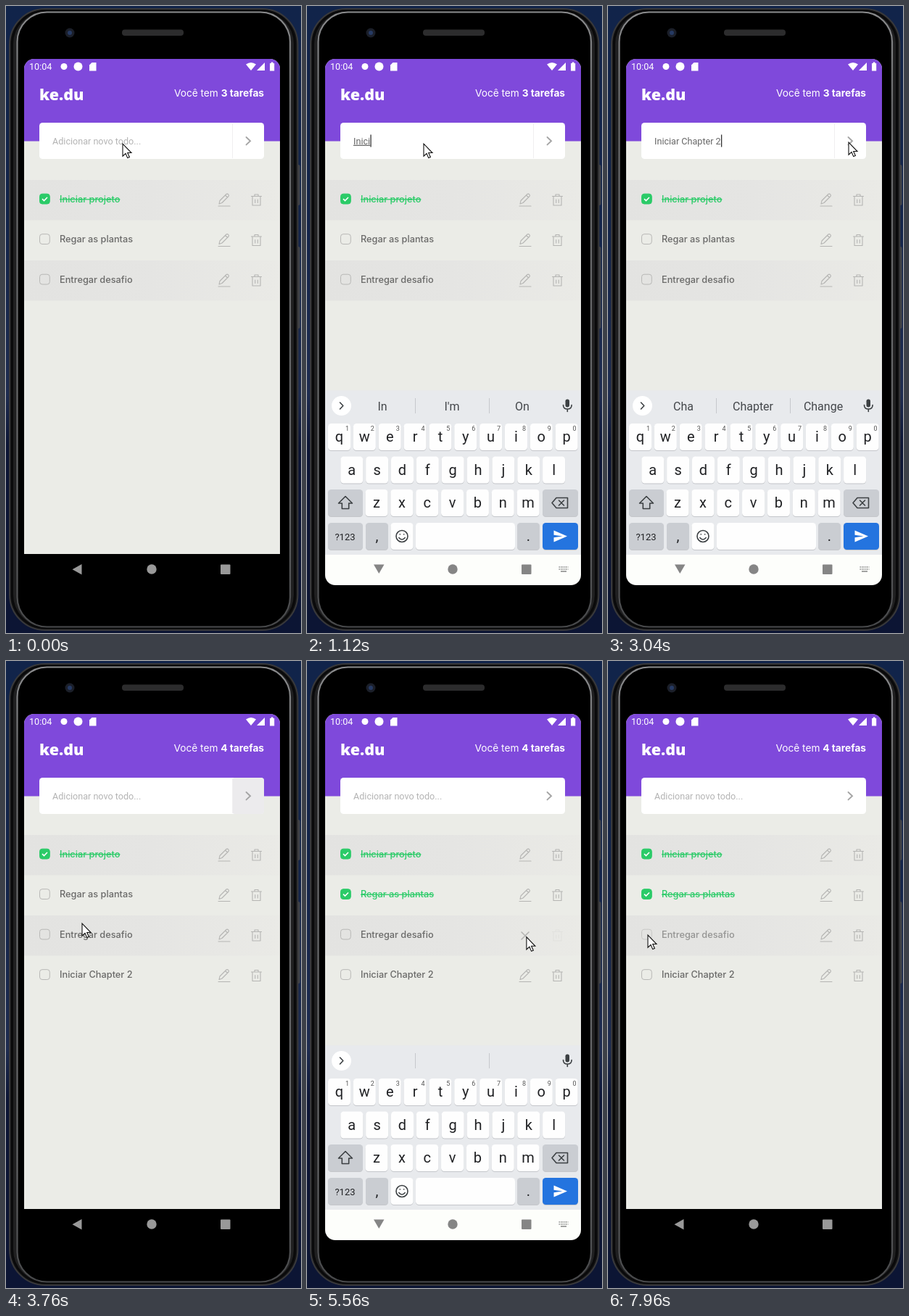
Animation, 407 px wide and 865 px high, one loop 8 s. Source, as an HTML page:

```html
<!DOCTYPE html>
<html lang="pt">
<head>
<meta charset="utf-8">
<title>Lista de tarefas</title>
<style>
html, body { margin: 0; width: 100%; height: 100%; overflow: hidden; background: #101f42; }
svg { display: block; width: 100vw; height: 100vh; }
text { white-space: pre; }
.app { font: 500 12.75px Inter, sans-serif; fill: #6a6a69; }
.head { font: 400 13.7px Inter, sans-serif; fill: #fff; }
.head .b { font-weight: 700; }
.brand { font: 900 21.5px "Open Sans", "Noto Sans", sans-serif; fill: #fff; }
.field { font: 400 12.6px Roboto, sans-serif; fill: #666; }
.status { font: 400 12.6px Roboto, sans-serif; fill: #fff; }
.key { font: 400 20px Roboto, sans-serif; fill: #202124; text-anchor: middle; }
.hint { font: 400 9px Roboto, sans-serif; fill: #555; text-anchor: middle; }
.sugg { font: 400 16px Roboto, sans-serif; fill: #44474b; text-anchor: middle; }
.done { fill: #2bcb68; text-decoration: line-through; }
.icon { fill: none; stroke: #b5b5b3; stroke-width: 1.1; stroke-linejoin: round; stroke-linecap: round; }
.dark { fill: none; stroke: #3c4043; stroke-width: 1.6; stroke-linejoin: round; stroke-linecap: round; }
</style>
</head>
<body>
<svg viewBox="0 0 407 865" preserveAspectRatio="none">
  <defs>
    <linearGradient id="wall" x2="0" y2="1">
      <stop offset="0" stop-color="#11244a"/><stop offset=".35" stop-color="#13244a"/>
      <stop offset=".62" stop-color="#1e2c50"/><stop offset=".7" stop-color="#0c1535"/>
      <stop offset="1" stop-color="#0c1534"/>
    </linearGradient>
    <linearGradient id="rim" x2="0" y2="1">
      <stop offset="0" stop-color="#8a8b8d"/><stop offset=".15" stop-color="#6b6c6e"/>
      <stop offset=".8" stop-color="#646567"/><stop offset="1" stop-color="#48494b"/>
    </linearGradient>
    <linearGradient id="band">
      <stop offset="0" stop-color="#e3e3e1"/><stop offset=".5" stop-color="#e5e5e3"/>
      <stop offset="1" stop-color="#eaeae6"/>
    </linearGradient>
    <clipPath id="screen"><rect x="25" y="73" width="353" height="726" rx="14"/></clipPath>
  </defs>

  <rect width="407" height="865" fill="url(#wall)"/>
  <g fill="#45474b">
    <rect x="400" y="219" width="5.500" height="56" rx="2"/>
    <rect x="400" y="332" width="5.500" height="113" rx="2"/>
  </g>
  <rect x="5" y="4" width="397.500" height="857" rx="49" fill="#161617" stroke="#39393b" stroke-width="2"/>
  <rect x="8.500" y="6.500" width="390" height="851.500" rx="46" fill="#202021" stroke="#0a0a0b" stroke-width="3"/>
  <rect x="15.500" y="8.500" width="376.500" height="848" rx="41" fill="#000" stroke="url(#rim)" stroke-width="2.200"/>
  <circle cx="88" cy="37" r="6.500" fill="#1b1f29"/>
  <circle cx="88" cy="37" r="3" fill="#263a63"/>
  <rect x="160" y="32.500" width="85" height="8.500" rx="4" fill="#2c2c2d"/>

  <g clip-path="url(#screen)">
    <rect x="25" y="73" width="353" height="683" fill="#ebece7"/>
    <rect x="25" y="73" width="353" height="113.500" fill="#7f49db"/>
    <rect x="25" y="756" width="353" height="44" fill="#000"/>
    <g fill="#999">
      <path d="M104.500 770v14.500l-13-7.250z"/><circle cx="201" cy="777" r="6.700"/>
      <rect x="296" y="770.500" width="13.500" height="13.500" rx="1"/>
    </g>

    <text class="status" x="32" y="88">10:04</text>
    <g fill="#fff">
      <circle cx="80" cy="83.500" r="4.500"/><circle cx="99.500" cy="83.500" r="6"/>
      <path d="M118.500 78h6v11.500h-9.500v-8z"/>
      <path d="M331 80.500q7-5 14 0l-7 8.500z"/><path d="M357 78v11h-11z"/>
      <path d="M364 79h1.700v-1.500h2.800V79h1.700v10.500H364z"/>
    </g>

    <text class="brand" x="46" y="130">ke.du</text>
    <text class="head" x="356" y="125.300" text-anchor="end">Você tem <tspan class="b" id="count"></tspan></text>

    <rect x="46" y="161" width="310" height="50" rx="4.500" fill="#fff"/>
    <rect id="press" x="312" y="161" width="44" height="50" rx="4" fill="#ecebed"/>
    <path id="divider" d="M312.500 162v48" stroke="#f0eff0"/>
    <path d="M331.500 181l5.500 5.200-5.500 5.200" fill="none" stroke="#a5a5a5" stroke-width="1.900" stroke-linecap="round"/>
    <text class="field" x="64" y="190.700" id="field"><tspan id="plain"></tspan><tspan id="composing" text-decoration="underline"></tspan></text>
    <rect id="caret" y="177.500" width="1.300" height="17" fill="#333"/>

    <g id="rows"></g>
    <g id="keyboard"></g>
  </g>

  <path id="mouse" d="M0 0v17.200l4-3.700 2.700 6.100 2.700-1.200-2.700-5.900h5.300z" fill="#fff" stroke="#111" stroke-width="1.100"/>
</svg>
<script>
const LOOP = 8000, TASK = 'Iniciar Chapter 2';
const $ = id => document.getElementById(id);
const clamp = (v, lo = 0, hi = 1) => Math.min(hi, Math.max(lo, v));
const ramp = (t, from, to) => clamp((t - from) / (to - from));
const within = (t, from, to) => t >= from && t < to;
const show = (id, on) => $(id).setAttribute('opacity', Number(on));
const setText = (id, s) => { if ($(id).textContent !== s) $(id).textContent = s; };

function taskRow(label, i) {
  const y = 240 + i * 55.5;
  return `<g id="row${i}" transform="translate(0 ${y})">
    ${i % 2 ? '' : '<rect x="25" width="353" height="55.5" fill="url(#band)"/>'}
    <g id="body${i}">
      <rect id="box${i}" x="46.500" y="19.200" width="13.800" height="13.800" rx="3.500" fill="none" stroke="#b8b8b6"/>
      <path id="tick${i}" d="M50 26.100l2.500 2.500 4.500-4.700" fill="none" stroke="#fff" stroke-width="1.500"/>
      <text class="app" id="label${i}" x="74" y="30.800">${label}</text>
    </g>
    <g class="icon">
      <path id="pen${i}" d="M293 36h16M294 33l1-4.500 9-9q1.300-1 2.700.3t.3 2.700l-9 9zM302.500 21l3 3"/>
      <path id="bin${i}" d="M338.500 22.500h14M343 22.500v-2.500h5v2.500M340 22.500v12.500h11V22.500M343.700 27v4.500M347.300 27v4.500"/>
    </g></g>`;
}

$('rows').innerHTML = ['Iniciar projeto', 'Regar as plantas', 'Entregar desafio', TASK].map(taskRow).join('') +
  '<path id="cross" class="icon" style="stroke-width:1.6" d="M296 374l10 10M306 374l-10 10"/>';

function buildKeyboard() {
  const key = (x, y, w, fill = '#fefefe') =>
    `<rect x="${x}" y="${y + 1}" width="${w}" height="37" rx="4.500" fill="#c4c6ca"/>
     <rect x="${x}" y="${y}" width="${w}" height="37" rx="4.500" fill="${fill}"/>`;
  const gray = '#cacdd2';
  const letters = (row, firstX, y) => [...row].map((c, i) => {
    const cx = firstX + i * 34.85;
    return key(cx - 15.5, y, 31) + `<text class="key" x="${cx}" y="${y + 25}">${c}</text>` +
      (row.length === 10 ? `<text class="hint" x="${cx + 11}" y="${y + 10}">${(i + 1) % 10}</text>` : '');
  }).join('');
  return `<rect x="25" y="530.500" width="353" height="227" fill="#e8eaed"/>
    <rect x="25" y="757" width="353" height="42" fill="#fdfefb"/>
    <circle cx="47.500" cy="551.500" r="13.500" fill="#fff"/>
    <path class="dark" d="M45.500 547l4.300 4.500-4.300 4.500"/>
    <path d="M149.500 541v21M251.500 541v21" stroke="#c6c8cc"/>
    <text class="sugg" id="s0" x="104" y="557.500"></text>
    <text class="sugg" id="s1" x="200" y="557.500"></text>
    <text class="sugg" id="s2" x="297" y="557.500"></text>
    <rect x="356.500" y="542.500" width="5.500" height="11" rx="2.700" fill="#3c4043"/>
    <path class="dark" d="M353.500 550.500q0 5.500 5.800 5.500t5.800-5.500M359.300 556.500v3"/>
    ${letters('qwertyuiop', 44.5, 576)}${letters('asdfghjkl', 61.8, 621.5)}
    ${key(29, 667, 48, gray)}${letters('zxcvbnm', 96, 667)}${key(325, 667, 49, gray)}
    <path class="dark" d="M53 676.500l-9.500 9.500h4.800v7.500h9.400V686h4.800z"/>
    <path class="dark" d="M344 678.500h15.500v14H344l-6-7zM347.500 682l7 7M354.500 682l-7 7"/>
    ${key(29, 713, 48, gray)}${key(81, 713, 31, gray)}${key(115.5, 713, 31)}
    ${key(150, 713, 137)}${key(290, 713, 31, gray)}${key(325, 713, 49, '#2474df')}
    <text class="key" x="52.500" y="736.500" style="font-size:13px">?123</text>
    <text class="key" x="96.500" y="738">,</text><text class="key" x="305.500" y="738">.</text>
    <circle class="dark" cx="131" cy="731.500" r="8"/>
    <path class="dark" d="M126.800 733.500q4.200 5 8.400 0M128.300 728.800v.2M133.700 728.800v.2"/>
    <path d="M340.500 723.500l18.500 8-18.500 8v-6.200l12-1.800-12-1.800z" fill="#fff"/>
    <g fill="#858585"><path d="M92 770.500h14.500l-7.250 12.500z"/><circle cx="201" cy="777" r="6.700"/>
    <rect x="296" y="770.500" width="13.500" height="13.500" rx="1"/></g>
    <path d="M347.500 774h13M347.500 777h13" stroke="#858585" stroke-width="1.500" stroke-dasharray="1.500 1"/>
    <path d="M350 780h8" stroke="#858585" stroke-width="1.500"/>`;
}
$('keyboard').innerHTML = buildKeyboard();

// time, x, y of the pointer tip
const pointer = [
  [0, 161, 190], [2720, 161, 190], [3020, 332, 188], [3220, 332, 188], [3760, 105, 362],
  [4100, 51, 322], [4420, 51, 322], [4880, 303, 385], [5040, 303, 385], [5500, 303, 381],
  [5900, 301, 377], [6700, 301, 377], [7450, 55, 378], [8000, 55, 378]
];

function pointerAt(t) {
  const i = pointer.findIndex(p => p[0] > t);
  const [t0, x0, y0] = pointer[i - 1], [t1, x1, y1] = pointer[i];
  const k = ramp(t, t0, t1), e = k * k * (3 - 2 * k);
  return [x0 + (x1 - x0) * e, y0 + (y1 - y0) * e];
}

function setDone(i, done) {
  $('label' + i).classList.toggle('done', done);
  $('box' + i).setAttribute('fill', done ? '#2bcb68' : 'none');
  $('box' + i).setAttribute('stroke', done ? '#2bcb68' : '#b8b8b6');
  show('tick' + i, done);
}

function drawField(t, added) {
  const typed = added ? '' : TASK.slice(0, clamp(Math.floor((t - 430) / 132), 0, TASK.length));
  const cut = typed.lastIndexOf(' ') + 1;
  const word = /^[a-z]/i.test(typed.slice(cut)) ? typed.slice(cut) : '';
  setText('plain', typed ? typed.slice(0, typed.length - word.length) : 'Adicionar novo todo...');
  setText('composing', word);
  $('field').style.fill = typed ? '#666' : '#b4b4b4';
  const width = typed ? $('field').getComputedTextLength() : 0;
  $('caret').setAttribute('x', 64.3 + width);
  show('caret', within(t, 160, 3120));
  const words = typed.length >= 8 ? ['Cha', 'Chapter', 'Change'] : ['In', "I'm", 'On'];
  words.forEach((w, i) => setText('s' + i, t > 4000 ? '' : w));
}

function draw(t) {
  const added = t >= 3120, editing = within(t, 5120, 6320);
  setText('count', (added ? 4 : 3) + ' tarefas');
  drawField(t, added);
  show('press', within(t, 3080, 4280));
  show('divider', t < 5300);

  show('row3', added);
  [0, 1, 2, 3].forEach(i => setDone(i, i === 0 || (i === 1 && t >= 4280)));
  show('body1', within(t, 4200, 4320) ? 0.5 : 1);
  show('body2', t >= 7880 ? 0.65 : 1);
  show('pen2', !within(t, 4960, 6320));
  show('bin2', editing ? 0.15 : 1);
  show('cross', editing);

  const open = Math.max(ramp(t, 200, 400) - ramp(t, 3140, 3300), ramp(t, 5280, 5460) - ramp(t, 5860, 6020));
  show('keyboard', open);
  $('keyboard').setAttribute('transform', `translate(0 ${(1 - open) ** 2 * 60})`);
  $('mouse').setAttribute('transform', `translate(${pointerAt(t)})`);
}

function tick() {
  draw(performance.now() % LOOP);
  requestAnimationFrame(tick);
}
tick();
</script>
</body>
</html>
```
